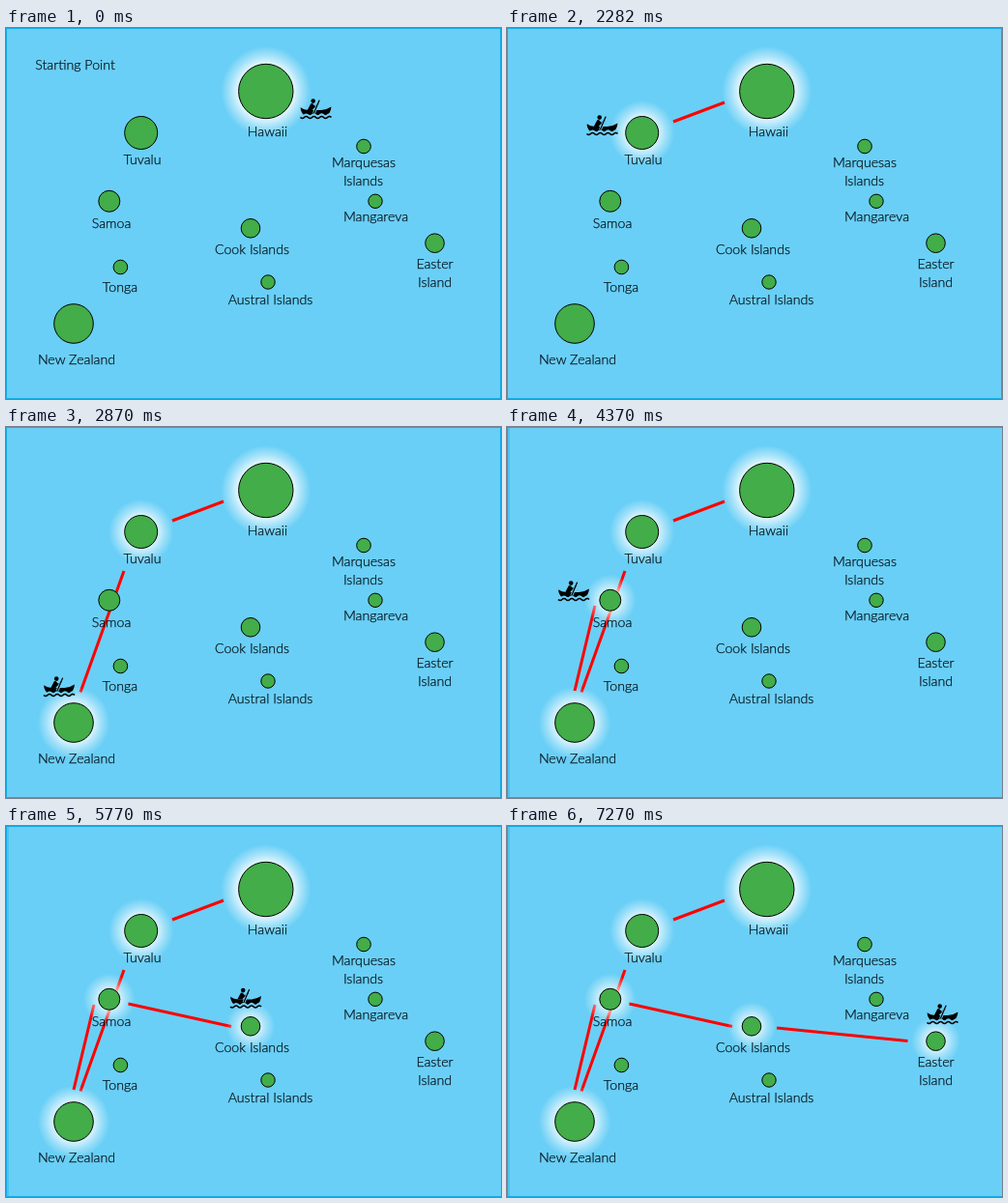
Recreate the animation shown at these times as an HTML page. Size 512x384 px, loop 8 s.

```html
<!DOCTYPE html>
<html lang="en">
<head>
<meta charset="utf-8">
<title>Island voyage</title>
<style>
  html, body { margin: 0; width: 100%; height: 100%; overflow: hidden; background: #6acff6; }
  svg { display: block; width: 100vw; height: 100vh; }
  text { font: 300 14.2px Lato, "Open Sans", sans-serif; fill: #06141e; stroke: #06141e; stroke-width: .25; text-anchor: middle; }
  .island { fill: #42ad49; stroke: #000; }
  .route { stroke: #f00; stroke-width: 3; }
</style>
</head>
<body>
<svg viewBox="0 0 512 384">
  <defs id="defs"></defs>
  <rect x=".5" y=".5" width="511" height="383" fill="#6acff6" stroke="#16ace6"/>
  <g id="shiftedEdge">
    <rect x="1" y="1" width="2" height="382" fill="#16ace6" opacity=".35"/>
    <rect x="511" y="1" width="1" height="382" fill="#6acff6"/>
  </g>
  <g id="journey"></g>
  <g id="islands"></g>
  <g id="labels"></g>
  <text id="start" x="71.5" y="43">Starting Point</text>
  <g id="canoe">
    <circle cx="13.7" cy="3.6" r="2.3"/>
    <path d="M11.3 6.3Q13 5.6 13.8 7L15.5 9.7L12.8 13H7.8Z"/>
    <path d="M12.5 7L15.5 9.8L19 6.5" fill="none" stroke="#000" stroke-width="1.6"/>
    <path d="M.6 10.2Q4 12.6 9 13H22Q28 12.4 32.4 9.4Q32.2 14.5 28.5 18.6H4.5Q.8 15 .6 10.2Z"/>
    <path d="M18.5 7L14.5 16" stroke="#6acff6" stroke-width="3"/>
    <path d="M20 3L14.5 16" stroke="#000" stroke-width="1.2" stroke-linecap="round"/>
    <path d="M.5 19.2q2 2 4 0t4 0t4 0t4 0t4 0t4 0t4 0t4 0" fill="none" stroke="#6acff6" stroke-width="3.5"/>
    <path d="M.5 20.5q2 2 4 0t4 0t4 0t4 0t4 0t4 0t4 0t4 0" fill="none" stroke="#000" stroke-width="1.6"/>
  </g>
</svg>
<script>
const islands = {
  hawaii: [268.8, 65.5, 28.2], tuvalu: [139.7, 108.5, 17], samoa: [106.8, 179.3, 11],
  tonga: [118.4, 247.5, 7.3], zealand: [70, 306, 20.3], cook: [253, 207.3, 9.8],
  austral: [271, 263, 7.2], marquesas: [370, 122.5, 7.3], mangareva: [382, 179.3, 7.2],
  easter: [443.5, 222.7, 9.8]
};
const labels = [
  ["Hawaii", 270.5, 112], ["Tuvalu", 141, 141], ["Samoa", 109, 207], ["Tonga", 118, 273],
  ["New Zealand", 73, 348], ["Cook Islands", 254.5, 234], ["Austral Islands", 273.5, 286],
  ["Marquesas", 370, 144], ["Islands", 369.5, 163], ["Mangareva", 382.5, 200],
  ["Easter", 443.5, 249], ["Island", 443.5, 268]
];
// Each stop: start time, island reached, canoe corner, route just sailed.
const stops = [
  { at: 0, island: "hawaii", canoe: [304, 72] },
  { at: 1400, island: "tuvalu", canoe: [82, 89], route: [225, 77, 172, 97] },
  { at: 2870, island: "zealand", canoe: [38.5, 257], route: [122, 149, 77, 274.5] },
  { at: 4370, island: "samoa", canoe: [52.5, 158], route: [70, 273, 91, 185] },
  { at: 5770, island: "cook", canoe: [231.5, 166.5], route: [126.5, 184, 233, 207.5] },
  { at: 7270, island: "easter", canoe: [434, 183], route: [279, 209, 414.5, 222.5] }
];
const LOOP = 8000;
const byId = id => document.getElementById(id);

function add(parent, tag, attributes, content = "") {
  const node = document.createElementNS("http://www.w3.org/2000/svg", tag);
  for (const name in attributes) node.setAttribute(name, attributes[name]);
  node.textContent = content;
  return parent.appendChild(node);
}

function addGlow(parent, name) {
  const [cx, cy, r] = islands[name];
  const outer = r + 14 + r * 0.15;
  const id = "glow-" + name;
  const gradient = add(byId("defs"), "radialGradient", { id });
  const edge = r / outer;
  const strength = 0.6 + r * 0.008;
  [[edge, strength], [edge + (1 - edge) * 0.5, strength * 0.45], [1, 0]].forEach(([offset, opacity]) =>
    add(gradient, "stop", { offset, "stop-color": "#fff", "stop-opacity": opacity }));
  add(parent, "circle", { cx, cy, r: outer, fill: `url(#${id})` });
}

for (const [text, x, y] of labels) add(byId("labels"), "text", { x, y }, text);
for (const [cx, cy, r] of Object.values(islands))
  add(byId("islands"), "circle", { cx, cy, r, class: "island" });

for (const stop of stops) {
  stop.group = add(byId("journey"), "g", {});
  if (stop.route) {
    const [x1, y1, x2, y2] = stop.route;
    add(stop.group, "line", { x1, y1, x2, y2, class: "route" });
  }
  addGlow(stop.group, stop.island);
}

const show = (node, visible) => node.setAttribute("visibility", visible ? "visible" : "hidden");
const startTime = performance.now();

function draw() {
  const time = (performance.now() - startTime) % LOOP;
  const reached = stops.filter(stop => stop.at <= time);
  stops.forEach(stop => show(stop.group, reached.includes(stop)));
  show(byId("start"), reached.length === 1);
  show(byId("shiftedEdge"), reached.length > 3);
  byId("canoe").setAttribute("transform", `translate(${reached[reached.length - 1].canoe})`);
  requestAnimationFrame(draw);
}
draw();
</script>
</body>
</html>
```
